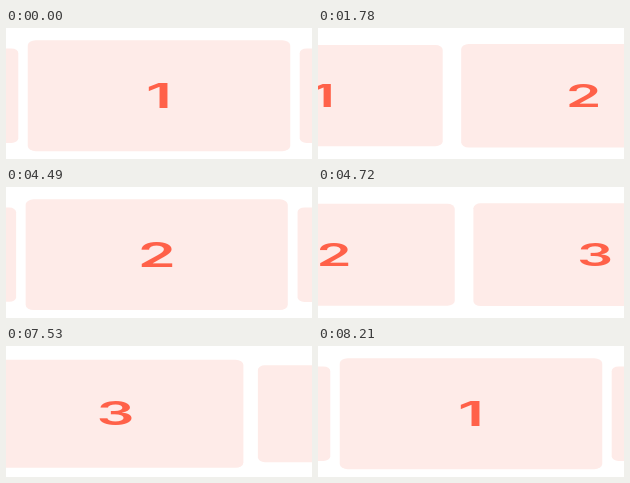
Recreate the animation shown at these times as an HTML page with a canvas. Size 306x131 px, loop 8900 ms.

```html
<!DOCTYPE html>
<html lang="en">
<head>
<meta charset="utf-8">
<title>Carousel</title>
<style>
  html, body { margin: 0; width: 100%; height: 100%; overflow: hidden; background: #fff; }
  canvas { display: block; width: 306px; height: 131px; }
</style>
</head>
<body>
<canvas id="stage"></canvas>
<script>
const LOOP = 8900, DURATION = 800;
const CARD_W = 262.5, CARD_H = 111, CENTER_X = 153, CENTER_Y = 67.7;
const SPACING = 270, DEPTH = 0.07, SHRINK = 0.09;
const STRETCH = 1.83; // the whole scene is wider than its natural proportions

// Each slide: first and last visible step, number of steps, time already run at the first
const slides = [
  { from: 1560, to: 2240, steps: 10, lead: 113 },
  { from: 4490, to: 5260, steps: 11, lead: 14 },
  { from: 7530, to: 8210, steps: 10, lead: 111 }
];

const canvas = document.getElementById('stage');
const ctx = canvas.getContext('2d');
const ratio = window.devicePixelRatio || 1;
canvas.width = 306 * ratio;
canvas.height = 131 * ratio;

// cubic-bezier(.25, .1, .25, 1)
function ease(x) {
  let lo = 0, hi = 1;
  for (let i = 0; i < 24; i++) {
    const u = (lo + hi) / 2;
    if (0.75 * u * (1 - u) + u ** 3 < x) lo = u; else hi = u;
  }
  return 0.3 * lo * (1 - lo) ** 2 + 3 * lo * lo * (1 - lo) + lo ** 3;
}

function progress({ from, to, steps, lead }, t) {
  if (t < from) return 0;
  if (t >= to) return 1;
  const step = (to - from) / (steps - 1);
  const held = Math.floor((t - from) / step) * step;
  return ease(Math.min(1, (held + lead) / DURATION));
}

function drawCard(index, offset) {
  const far = Math.abs(offset);
  const perspective = 1 / (1 + DEPTH * far);
  const scale = (1 - SHRINK * far) * perspective;
  ctx.save();
  ctx.translate(CENTER_X + SPACING * offset * perspective, CENTER_Y);
  ctx.scale(scale, scale);
  ctx.fillStyle = '#feebe8';
  ctx.beginPath();
  ctx.roundRect(-CARD_W / 2, -CARD_H / 2, CARD_W, CARD_H, { x: 8, y: 5.5 });
  ctx.fill();
  ctx.scale(STRETCH, 1);
  ctx.fillStyle = '#ff6149';
  ctx.fillText((index + 3) % 3 + 1, 0, 12);
  ctx.restore();
}

function draw(now) {
  const t = now % LOOP;
  const position = slides.reduce((sum, slide) => sum + progress(slide, t), 0);
  ctx.setTransform(ratio, 0, 0, ratio, 0, 0);
  ctx.fillStyle = '#fff';
  ctx.fillRect(0, 0, 306, 131);
  ctx.font = '600 33.5px Inter, Roboto, sans-serif';
  ctx.textAlign = 'center';
  const nearest = Math.round(position);
  for (let i = nearest - 2; i <= nearest + 2; i++) drawCard(i, i - position);
}

const start = performance.now();
function tick() {
  draw(performance.now() - start);
  requestAnimationFrame(tick);
}
tick();
</script>
</body>
</html>
```
